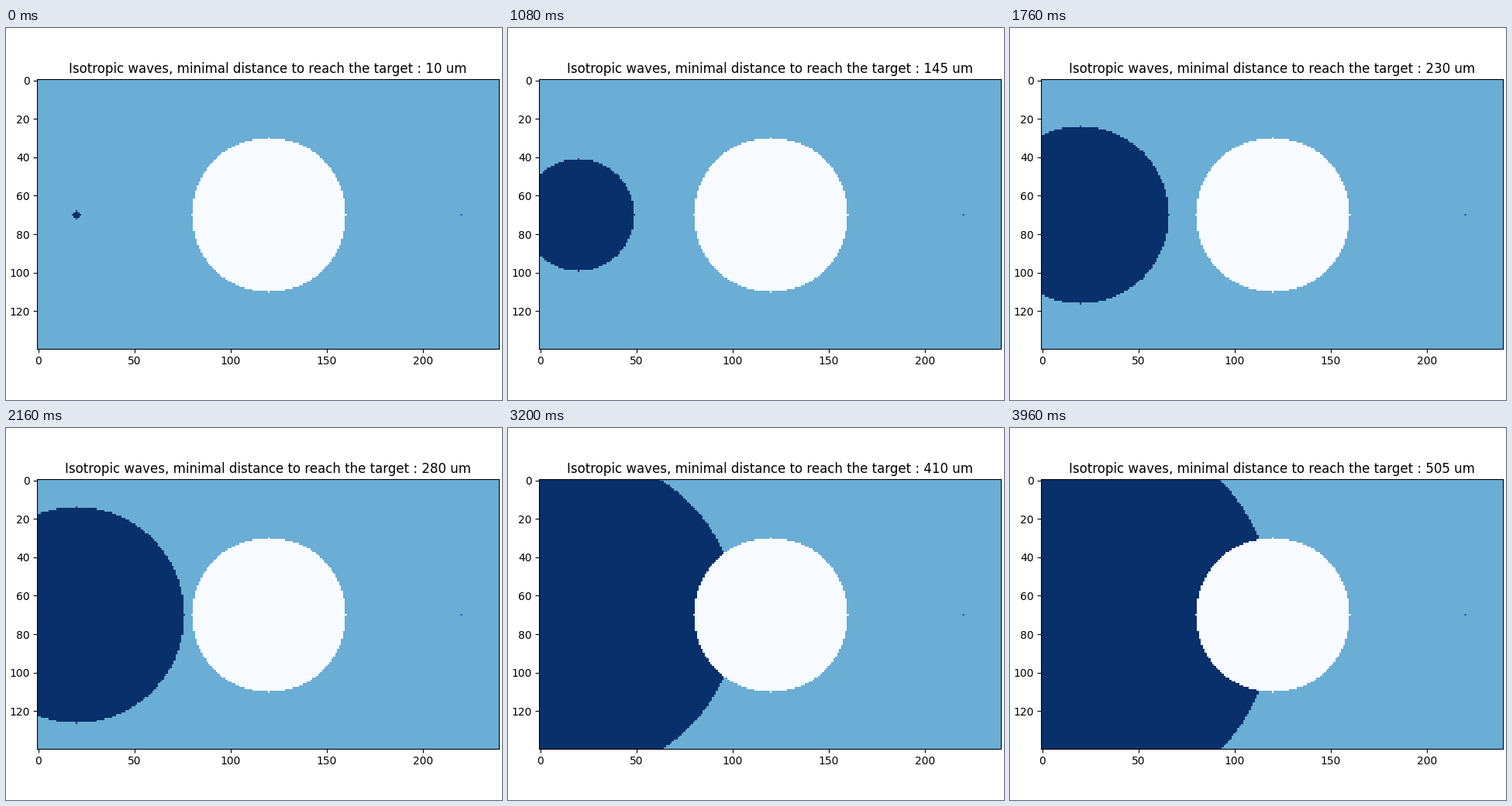
A matplotlib script that plays this animation: 640x480 px, repeating every 4 s.

```python
import matplotlib.pyplot as plt
import numpy as np
from matplotlib.animation import FuncAnimation

W, H, DPI = 640, 480, 100
COLS, ROWS = 240, 140
FRAMES, STEP = 100, 40
LEFT, RIGHT = 40.4, 635.8

FREE, BLOCKED, TARGET, WAVE = 0.5, 0.0, 0.75, 1.0

y, x = np.mgrid[:ROWS, :COLS]


def disc(cx, cy, r):
    return (x - cx) ** 2 + (y - cy) ** 2 <= r * r


obstacle = disc(120, 70, 40)
base = np.full((ROWS, COLS), FREE)
base[obstacle] = BLOCKED
base[70, 220] = TARGET


def field(i):
    grid = base.copy()
    grid[disc(20, 70, i + 2) & ~obstacle] = WAVE
    return grid


def label(i):
    return ("Isotropic waves, minimal distance to reach the target : "
            f"{10 + 5 * i} um")


fig = plt.figure(figsize=(W / DPI, H / DPI), dpi=DPI)
width = RIGHT - LEFT
height = width * ROWS / COLS
ax = fig.add_axes([LEFT / W, (H - height) / 2 / H, width / W, height / H])
image = ax.imshow(field(0), cmap="Blues", vmin=0, vmax=1,
                  interpolation="nearest", aspect="auto")
title = ax.set_title(label(0))


def update(i):
    image.set_data(field(i))
    title.set_text(label(i))
    return image, title


anim = FuncAnimation(fig, update, frames=FRAMES, interval=STEP,
                     repeat=True, repeat_delay=0, blit=False)
plt.show()
```
